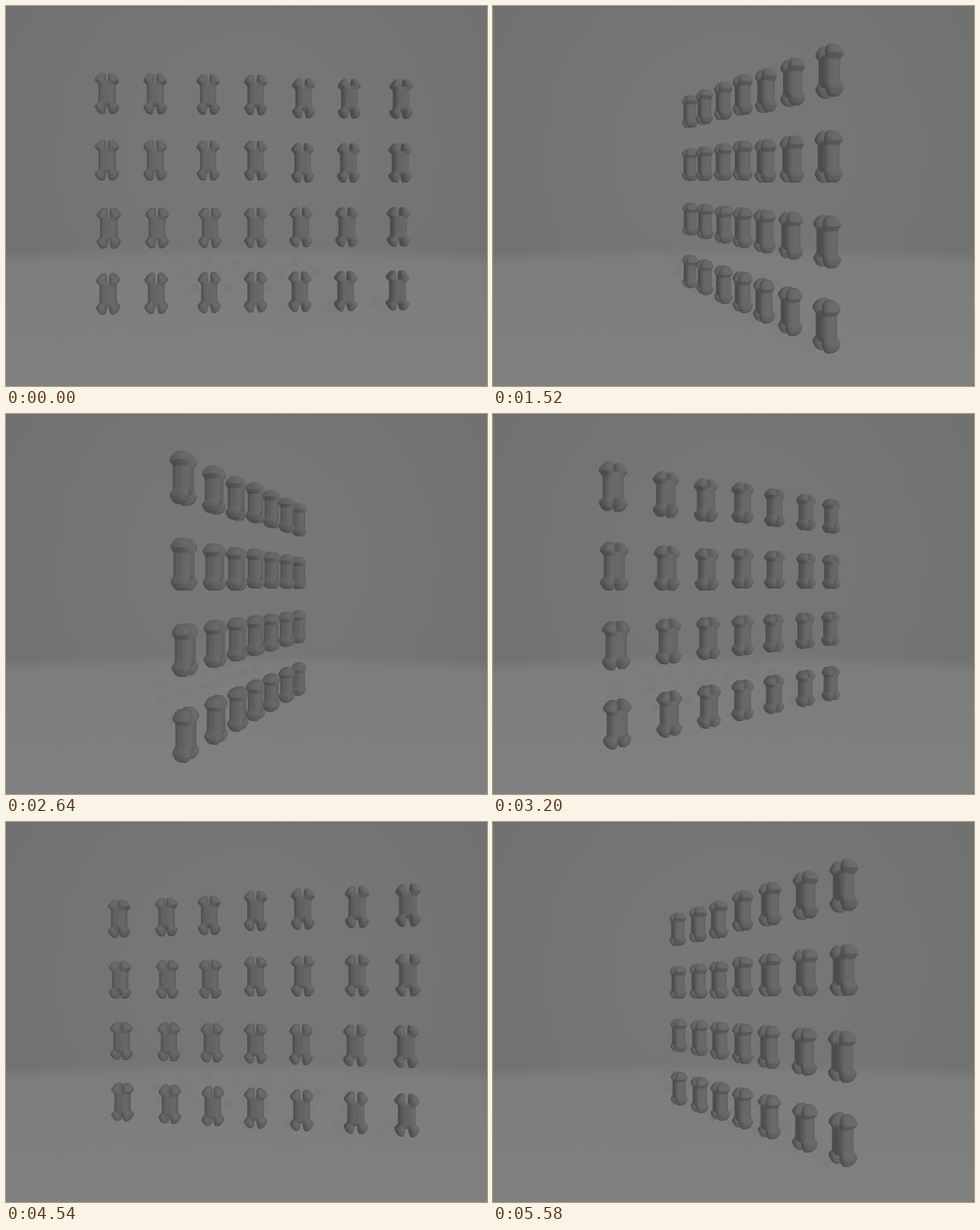
Write an HTML page with a canvas that moves like this. It is 686 px wide and 542 px high and loops after 5.65 s.

```html
<!DOCTYPE html>
<html lang="en">
<head>
<meta charset="utf-8">
<title>Turning grid of bones</title>
<style>
html, body { margin: 0; height: 100%; overflow: hidden; background: #757575; }
canvas { display: block; }
</style>
</head>
<body>
<canvas id="stage" width="686" height="542"></canvas>
<script>
const ctx = document.getElementById('stage').getContext('2d');
const LOOP = 5650, HOLD = 200, STEP = 70;
const DISTANCE = 800, CENTER = { x: 343, y: 251.5 }, AXIS_X = 13, FLOOR_Y = 190;
const LIGHT = [0.45, -0.4, 0.8];
const SIDES = 16;

// Slightly uneven columns and rows
const COLUMNS = [-208, -141, -66.5, 0, 66.5, 133, 209];
const ROWS = [-124.5, -31, 64.5, 156.5];
const LEFT_SHIFT = [-1, -1, 1.5, 0.5], RIGHT_SHIFT = [2.5, 1, -1.5, -3], DROP = [4, 3, 0, 0];
const bones = ROWS.flatMap((y, r) => COLUMNS.map((x, c) => ({
  x: x + (c < 3 ? LEFT_SHIFT[r] : c > 3 ? RIGHT_SHIFT[r] : 0),
  y: y + (c > 3 ? DROP[r] : 0)
})));

// Rings are [centre x, y, half width, half depth]
const faces = [];
function loft(rings, power) {
  const bend = v => Math.sign(v) * Math.abs(v) ** power;
  const loops = rings.map(([cx, y, rx, rz]) => Array.from({ length: SIDES }, (_, i) => {
    const a = (i + 0.5) / SIDES * 2 * Math.PI;
    return [cx + rx * bend(Math.cos(a)), y, rz * bend(Math.sin(a))];
  }));
  const middle = rings.reduce((sum, r) => [sum[0] + r[0] / rings.length, sum[1] + r[1] / rings.length, 0], [0, 0, 0]);
  for (let k = 1; k < loops.length; k++)
    for (let i = 0; i < SIDES; i++) {
      const j = (i + 1) % SIDES;
      addFace([loops[k - 1][i], loops[k - 1][j], loops[k][j], loops[k][i]], middle);
    }
  addFace(loops[loops.length - 1], middle);
}

function addFace(points, middle) {
  const mean = [0, 1, 2].map(d => points.reduce((s, p) => s + p[d], 0) / points.length);
  const sub = (a, b) => a.map((v, d) => v - b[d]);
  const half = points.length / 2, quarter = points.length / 4;
  const u = sub(points[half], points[0]), v = sub(points[half + quarter], points[quarter]);
  const normal = [u[1] * v[2] - u[2] * v[1], u[2] * v[0] - u[0] * v[2], u[0] * v[1] - u[1] * v[0]];
  const out = sub(mean, middle);
  const side = normal[0] * out[0] + normal[1] * out[1] + normal[2] * out[2] < 0 ? -1 : 1;
  const size = side * (Math.hypot(...normal) || 1);
  faces.push({ points, mean, normal: normal.map(n => n / size) });
}

loft([[0, -16.5, 9, 8], [0, -13, 11.2, 9.8], [0, 13, 11.2, 9.8], [0, 16.5, 9, 8]], 0.7);
for (const sx of [-1, 1])
  for (const sy of [-1, 1]) {
    const flare = sy > 0 ? 1 : 0;
    loft([
      [6, 12, 4.5, 8.5], [9, 17.5, 7, 10.4], [8.8, 20.5, 6.8, 10.2],
      [7 + flare, 25.3, 4.8, 8], [6 + flare, 27.8, 2.8, 5]
    ].map(([x, y, rx, rz]) => [sx * x, sy * y, rx, rz]), 0.85);
  }

function project(x, y, z) {
  const scale = DISTANCE / (DISTANCE - z);
  return [CENTER.x + (AXIS_X + x) * scale, CENTER.y + y * scale, scale];
}

function drawRoom() {
  const wall = ctx.createRadialGradient(343, 210, 60, 343, 210, 460);
  wall.addColorStop(0, '#777777');
  wall.addColorStop(1, '#707070');
  const floor = ctx.createRadialGradient(343, 5247, 4700, 343, 5247, 4910);
  floor.addColorStop(0, '#808080');
  floor.addColorStop(0.9, '#7d7d7d');
  floor.addColorStop(1, 'rgba(122,122,122,0)');
  for (const fill of [wall, floor]) {
    ctx.fillStyle = fill;
    ctx.fillRect(0, 0, 686, 542);
  }
}

function drawShadow(x, y, z) {
  const fall = dy => {
    const drop = FLOOR_Y - y - dy;
    return project(x - 0.346 * drop, FLOOR_Y, z - 1.68 * drop);
  };
  const a = fall(-17), b = fall(17);
  ctx.lineWidth = 20 * a[2];
  ctx.beginPath();
  ctx.moveTo(a[0], a[1]);
  ctx.lineTo(b[0], b[1]);
  ctx.stroke();
}

function draw(angle) {
  const cos = Math.cos(angle), sin = Math.sin(angle);
  const turn = ([x, y, z]) => [x * cos - z * sin, y, x * sin + z * cos];
  drawRoom();

  ctx.lineCap = 'butt';
  ctx.strokeStyle = 'rgba(0,0,0,0.02)';
  for (const { x, y } of bones) drawShadow(x * cos, y, x * sin);

  const turned = faces.map(f => {
    const normal = turn(f.normal);
    const lit = Math.max(0, normal.reduce((s, n, d) => s + n * LIGHT[d], 0));
    const gray = Math.round(76 + 32 * lit);
    return { points: f.points.map(turn), mean: turn(f.mean), normal, color: `rgb(${gray},${gray},${gray})` };
  }).sort((a, b) => a.mean[2] - b.mean[2]);

  ctx.lineWidth = 0.5;
  ctx.lineJoin = 'round';
  for (const bone of [...bones].sort((a, b) => (a.x - b.x) * sin)) {
    const [bx, by, bz] = turn([bone.x, bone.y, 0]);
    for (const { points, mean, normal, color } of turned) {
      const facing = normal[0] * (-AXIS_X - bx - mean[0]) - normal[1] * (by + mean[1])
        + normal[2] * (DISTANCE - bz - mean[2]);
      if (facing <= 0) continue;
      ctx.beginPath();
      for (const [x, y, z] of points) {
        const [px, py] = project(bx + x, by + y, bz + z);
        ctx.lineTo(px, py);
      }
      ctx.closePath();
      ctx.fillStyle = ctx.strokeStyle = color;
      ctx.fill();
      ctx.stroke();
    }
  }
}

let shown = -1;
function tick(now) {
  const t = now % LOOP;
  const step = t < HOLD ? 0 : Math.floor((t - 120) / STEP);
  if (step !== shown) {
    shown = step;
    const degrees = step ? 4.5 + 3 * step : -3.5;
    draw(degrees * Math.PI / 180);
  }
  requestAnimationFrame(tick);
}
tick(performance.now());
</script>
</body>
</html>
```
